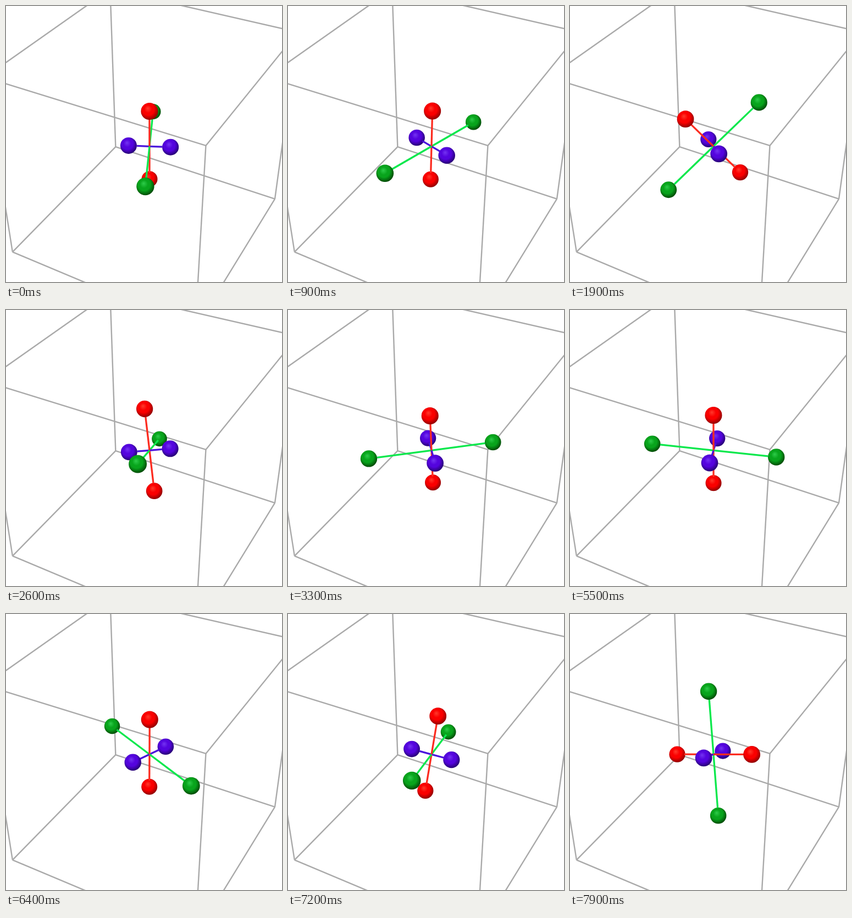
Animation, 502 px wide and 502 px high, one loop 8000 ms. Source, as an HTML page with a canvas:

```html
<!DOCTYPE html>
<html lang="en">
<head>
<meta charset="utf-8">
<title>Tumbling rigid body</title>
<style>
html, body { margin: 0; width: 100%; height: 100%; overflow: hidden; background: #fff; }
canvas { display: block; }
</style>
</head>
<body>
<canvas id="stage" width="502" height="502"></canvas>
<script>
const ctx = document.getElementById('stage').getContext('2d');
const LOOP = 8000, STEP = 100, RAD = Math.PI / 180;

// Perspective camera looking at the middle of a cube from (1.3, -2.4, 2)
const CX = 261, CY = 255.3, UNIT = 38.2, HALF = 5 * UNIT, RADIUS = 15;
const TURN = Math.atan2(1.3, 2.4), TILT = Math.atan2(2, Math.hypot(1.3, 2.4));
const DIST = 2 * HALF * Math.hypot(1.3, 2.4, 2);
const COS = Math.cos(TILT), SIN = Math.sin(TILT);

// Free rotation about the unstable middle axis, moments of inertia 1 : 4 : 9
const SHORT = Math.sqrt(5 / 32), LONG = Math.sqrt(27 / 32);
const PHASE = 243.2 * RAD, SPIN = 154.5 * RAD;
const FLIP_RATE = SPIN * Math.sqrt(5 / 3);
const FLIP_1 = 2.185, FLIP_2 = 7.82;
const PHASE_SHIFT = 2 * Math.atan2(SHORT, LONG);

const RED = { rod: '#fc2c20', light: '#ff3a2c', base: '#fa0000', dark: '#900000' };
const GREEN = { rod: '#0ae84c', light: '#2ecc4a', base: '#08a41c', dark: '#004a06' };
const PURPLE = { rod: '#4a12dc', light: '#7434f2', base: '#5404de', dark: '#260074' };

const mix = (m, u, n, v) => u.map((x, i) => m * x + n * v[i]);
const cross = (u, v) => [
  u[1] * v[2] - u[2] * v[1], u[2] * v[0] - u[0] * v[2], u[0] * v[1] - u[1] * v[0]];

// Unit axes in the world: x right, y away, z up
function axesAt(sec) {
  const second = sec > (FLIP_1 + FLIP_2) / 2, side = second ? -1 : 1;
  const tau = FLIP_RATE * (sec - (second ? FLIP_2 : FLIP_1));
  const angle = PHASE + SPIN * sec - (second ? PHASE_SHIFT : 0);
  const flat = 1 / Math.cosh(tau), rise = -side * Math.tanh(tau);
  const dir = [Math.cos(angle), Math.sin(angle), 0], up = [0, 0, 1];
  const red = mix(flat, dir, rise, up);
  const u = mix(-rise, dir, flat, up), w = cross(red, u);
  return {
    red,
    green: mix(LONG, u, side * SHORT, w),
    purple: mix(-side * SHORT, u, LONG, w)
  };
}

function project([x, y, z], length) {
  const depth = (z * SIN - y * COS) * length;
  const scale = DIST / (DIST - depth);
  return {
    x: CX + x * length * scale,
    y: CY - (z * COS + y * SIN) * length * scale,
    depth, scale
  };
}

function line(from, to, color, width) {
  ctx.strokeStyle = color;
  ctx.lineWidth = width;
  ctx.beginPath();
  ctx.moveTo(from.x, from.y);
  ctx.lineTo(to.x, to.y);
  ctx.stroke();
}

function ball({ x, y, scale }, color) {
  const r = RADIUS * scale;
  const shade = ctx.createRadialGradient(x - r * 0.2, y - r * 0.35, 0, x - r * 0.1, y - r * 0.15, r * 1.15);
  shade.addColorStop(0, color.light);
  shade.addColorStop(0.4, color.base);
  shade.addColorStop(0.6, color.base);
  shade.addColorStop(1, color.dark);
  ctx.fillStyle = shade;
  ctx.beginPath();
  ctx.arc(x, y, r, 0, 2 * Math.PI);
  ctx.fill();
}

function drawCube() {
  const corner = (i, z) => {
    const a = (i * 90 + 45) * RAD - TURN;
    return project([Math.SQRT2 * Math.cos(a), Math.SQRT2 * Math.sin(a), z], HALF);
  };
  const edge = (p, q) => line(p, q, '#a9a9a9', 2.4);
  for (let i = 0; i < 4; i++) {
    edge(corner(i, -1), corner(i, 1));
    for (const z of [-1, 1]) edge(corner(i, z), corner(i + 1, z));
  }
}

function drawBody(sec) {
  const { red, green, purple } = axesAt(sec);
  const center = { x: CX, y: CY };
  const parts = [];
  for (const [axis, size, color] of [[purple, 1, PURPLE], [red, 2, RED], [green, 3, GREEN]]) {
    for (const sign of [1, -1]) {
      const dir = axis.map(v => v * sign), length = size * UNIT;
      const end = project(dir, length), tip = project(dir, length - RADIUS);
      parts.push({ depth: end.depth, paint: () => ball(end, color) });
      parts.push({ depth: end.depth / 2, paint: () => line(center, tip, color.rod, 3.3) });
    }
  }
  parts.sort((p, q) => p.depth - q.depth).forEach(p => p.paint());
}

const start = performance.now();
function tick() {
  const ms = (performance.now() - start) % LOOP;
  ctx.clearRect(0, 0, 502, 502);
  drawCube();
  drawBody(Math.floor(ms / STEP) * STEP / 1000);
  requestAnimationFrame(tick);
}
tick();
</script>
</body>
</html>
```
